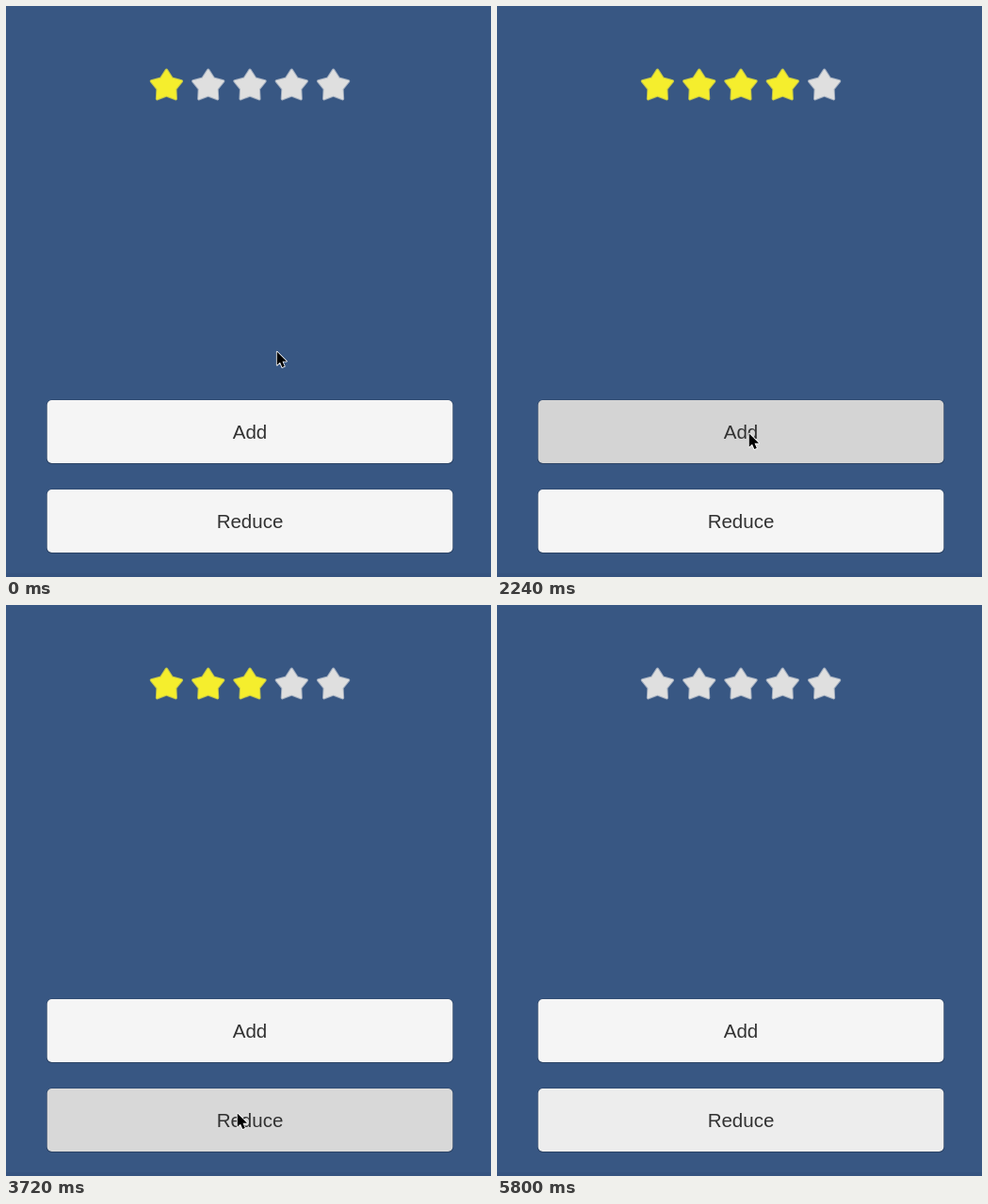
Animation of 515x607 px, one loop 5950 ms. Source, as an HTML page:

```html
<!DOCTYPE html>
<html lang="en">
<head>
<meta charset="utf-8">
<title>Star rating</title>
<style>
  html, body { margin: 0; width: 100%; height: 100%; overflow: hidden; background: #385783; }
  svg { display: block; width: 515px; height: 607px; }
  text { font: 20.5px "Liberation Sans", Arial, sans-serif; fill: #323232; text-anchor: middle; }
</style>
</head>
<body>
<svg id="stage" viewBox="0 0 515 607"></svg>
<script>
const LOOP = 5950;
const IDLE = 0xf5, ACTIVE = 0xed;
const stage = document.getElementById("stage");

function add(tag, attrs, parent = stage) {
  const node = document.createElementNS("http://www.w3.org/2000/svg", tag);
  for (const key in attrs) node.setAttribute(key, attrs[key]);
  return parent.appendChild(node);
}

function starPoints(cx, cy, outer, inner) {
  return Array.from({ length: 10 }, (_, i) => {
    const r = i % 2 ? inner : outer;
    const a = (i / 5 - 0.5) * Math.PI;
    return [cx + r * Math.cos(a), cy + r * Math.sin(a)].map(v => v.toFixed(2)).join();
  }).join(" ");
}

function makeStar(i) {
  const points = starPoints(170.4 + i * 44.3, 85.1, 16.8, 9.8);
  const layer = width => add("polygon", { points, "stroke-width": width, "stroke-linejoin": "round" });
  return { edge: layer(3.4), face: layer(1.4) };
}

function makeButton(y, label) {
  add("rect", { x: 43, y: y - 0.5, width: 432, height: 68.5, rx: 5.5, fill: "#23354f", opacity: 0.55 });
  const face = add("rect", { x: 43.7, y, width: 430.6, height: 67, rx: 5 });
  add("text", { x: 259, y: y + 41 }).textContent = label;
  return face;
}

function paint(node, color) {
  node.setAttribute("fill", color);
  node.setAttribute("stroke", color);
}

const gray = level => `rgb(${level},${level},${level})`;

add("rect", { width: 515, height: 607, fill: "#385783" });
add("rect", { y: 603, width: 515, height: 4, fill: "#35537f" });
const stars = Array.from({ length: 5 }, (_, i) => makeStar(i));
const addButton = makeButton(419, "Add");
const reduceButton = makeButton(514, "Reduce");
const cursor = add("path", {
  d: "M.7 1.5V15.8L4 12.7L6.3 18.1L8.8 17L6.5 11.8H11Z",
  fill: "#000", stroke: "#fff", "stroke-width": 1.6, "stroke-linejoin": "round", "paint-order": "stroke"
});

// Each track lists [start time, value]; a value holds until the next entry.
const rating = [[0, 1], [1050, 2], [1500, 3], [1940, 4], [2390, 5],
  [3420, 4], [3720, 3], [4160, 2], [4610, 1], [5050, 0]];
const addLevel = [[0, IDLE], [750, ACTIVE], [900, 0xd0], [1050, ACTIVE], [1500, 0xe3],
  [1640, ACTIVE], [2240, 0xd4], [2390, ACTIVE], [3270, IDLE]];
const reduceLevel = [[0, IDLE], [2830, ACTIVE], [3270, 0xd0], [3420, ACTIVE], [3720, 0xd8],
  [3860, ACTIVE], [4610, 0xdc], [4760, ACTIVE], [4910, 0xd0], [5050, ACTIVE]];
const pointer = [[0, [287, 366]], [450, [285, 382]], [600, [273, 432]], [750, [267, 453]],
  [2680, [265, 470]], [2830, [251, 522]], [2980, [245, 539]],
  [5350, [268, 547]], [5500, [340, 569]], [5650, [424, 593]], [5800, null]];

const valueAt = (track, t) => track.findLast(([start]) => start <= t)[1];

function render(t) {
  const count = valueAt(rating, t);
  stars.forEach(({ edge, face }, i) => {
    paint(edge, i < count ? "#bfc24b" : "#a4afbf");
    paint(face, i < count ? "#f5ee2d" : "#dfdfdf");
  });
  addButton.setAttribute("fill", gray(valueAt(addLevel, t)));
  reduceButton.setAttribute("fill", gray(valueAt(reduceLevel, t)));
  const spot = valueAt(pointer, t);
  cursor.setAttribute("visibility", spot ? "visible" : "hidden");
  if (spot) cursor.setAttribute("transform", `translate(${spot})`);
}

const began = performance.now();
function tick() {
  render((performance.now() - began) % LOOP);
  requestAnimationFrame(tick);
}
tick();
</script>
</body>
</html>
```
